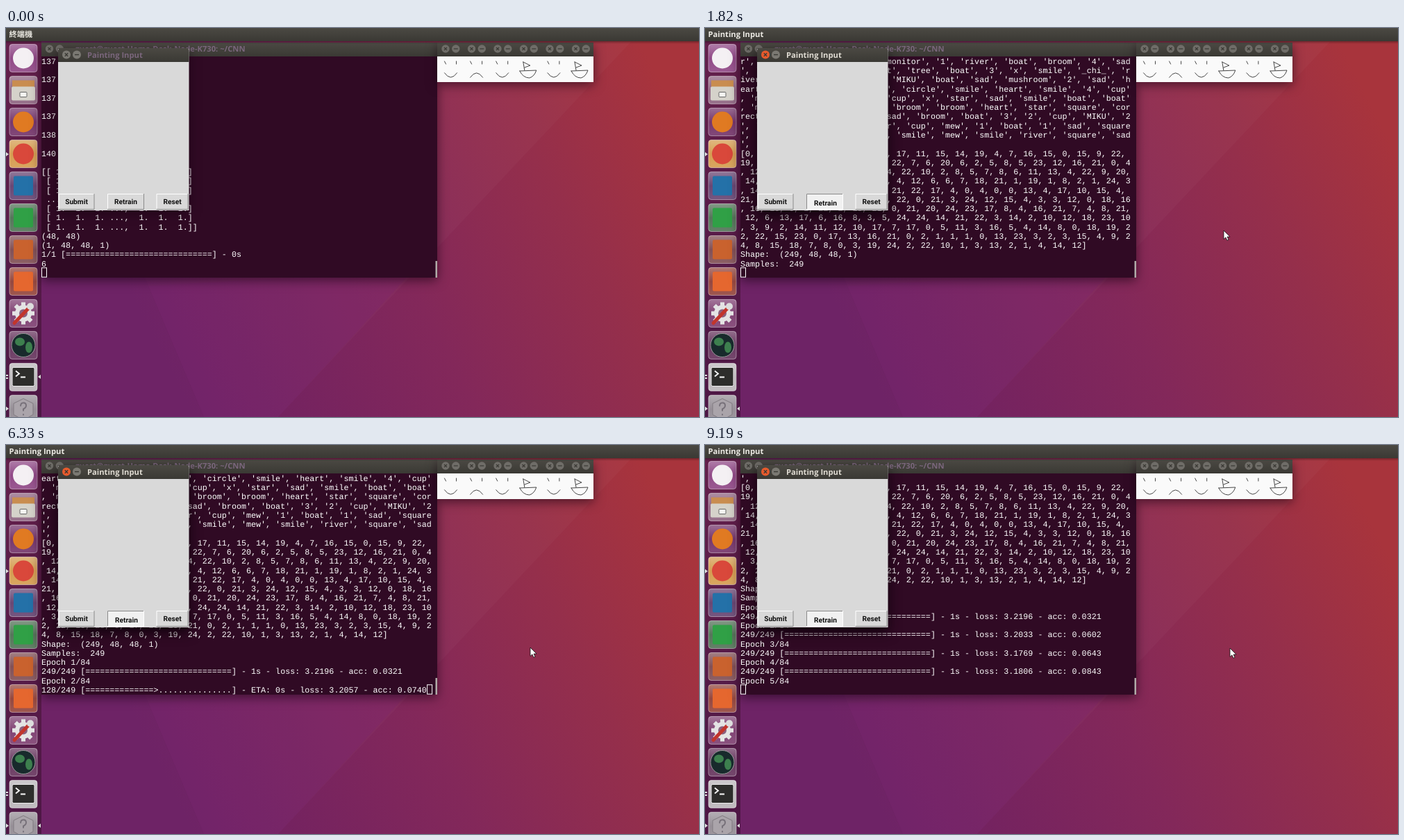
Animation of 998x561 px, one loop 9770 ms. Source, as an HTML page:

```html
<!DOCTYPE html>
<html lang="zh-Hant">
<head>
<meta charset="utf-8">
<title>Painting Input</title>
<style>
  html, body { margin: 0; width: 100%; height: 100%; overflow: hidden; background: #6e1f62; }
  svg { display: block; width: 100vw; height: 100vh; }
  text { white-space: pre; text-rendering: geometricPrecision; }
  .title { font: bold 11.2px "Open Sans", "Noto Sans CJK TC", "Noto Sans CJK", sans-serif; }
  .label { font: bold 10.2px Roboto, sans-serif; fill: #111; text-anchor: middle; }
  #rows text { font: 11.71px "Liberation Mono", monospace; fill: #fff; }
  .shadow { filter: drop-shadow(0 4px 8px rgba(20, 0, 15, .6)); }
  .focus { filter: drop-shadow(0 7px 9px rgba(10, 0, 8, .85)); }
  #sketches { fill: none; stroke: #333; stroke-width: .9; stroke-linecap: round; stroke-linejoin: round; }
</style>
</head>
<body>
<svg viewBox="0 0 998 561">
  <defs>
    <linearGradient id="wall" gradientUnits="userSpaceOnUse" x1="270" y1="560" x2="1000" y2="190">
      <stop offset="0" stop-color="#6d2063"/>
      <stop offset=".45" stop-color="#83285a"/>
      <stop offset=".75" stop-color="#952f4b"/>
      <stop offset="1" stop-color="#a8343c"/>
    </linearGradient>
    <linearGradient id="bar" x1="0" y1="0" x2="0" y2="1">
      <stop offset="0" stop-color="#4b4943"/>
      <stop offset="1" stop-color="#3a3934"/>
    </linearGradient>
    <linearGradient id="dock" x1="0" y1="0" x2="0" y2="1">
      <stop offset="0" stop-color="#64204c"/>
      <stop offset="1" stop-color="#4d1745"/>
    </linearGradient>
    <linearGradient id="gloss" x1="0" y1="0" x2="0" y2="1">
      <stop offset="0" stop-color="#fff" stop-opacity=".3"/>
      <stop offset=".5" stop-color="#fff" stop-opacity=".04"/>
      <stop offset="1" stop-color="#fff" stop-opacity=".12"/>
    </linearGradient>
    <linearGradient id="fade" x1="0" y1="0" x2="0" y2="1">
      <stop offset="0" stop-opacity=".3"/>
      <stop offset="1" stop-opacity="0"/>
    </linearGradient>
  </defs>

  <rect width="998" height="561" fill="url(#wall)"/>
  <path d="M50 20H900L392 561H50Z" fill="#fff" opacity=".025"/>
  <path d="M586 350L392 561H285L205 372Z" fill="#7a1f72" opacity=".2"/>
  <path d="M50 360H200L285 561H50Z" fill="#5d1c58" opacity=".1"/>

  <rect y="19" width="51" height="542" fill="url(#dock)"/>
  <g id="icons"></g>
  <g fill="#ddd">
    <path d="M0 179l4 3-4 3zM0 546l4 3-4 3z"/>
    <path d="M0 500h3v2H0zM0 504h3v2H0z"/>
    <path id="active" d="M50 -3v6l-4-3z"/>
  </g>

  <rect class="shadow" x="51" y="22" width="570" height="338" fill="#300a24"/>
  <rect x="51" y="21" width="570" height="20" fill="url(#bar)"/>
  <text class="title" x="344.500" y="34.300" text-anchor="end" fill="#7a667c">guest@guest-Home-Desk-Node-K730: ~/CNN</text>
  <g id="rows"></g>
  <rect id="caret" y="345.800" width="7" height="13.400" fill="none" stroke="#fff"/>
  <rect x="618.500" y="336" width="2.500" height="24" fill="#b0aaa8"/>

  <rect class="shadow" x="621" y="22" width="225" height="56" fill="#fafafa"/>
  <rect x="621" y="21" width="225" height="20" fill="url(#bar)"/>
  <g id="knobs"></g>
  <g id="sketches"></g>

  <rect id="panel" x="75" y="30" width="188.500" height="233" fill="#d9d9d9"/>
  <path d="M75 49V33q0-4 4-4h180.500q4 0 4 4v16z" fill="url(#bar)"/>
  <circle id="close" cx="87" cy="38.500" r="6"/>
  <path d="M84.800 36.300l4.400 4.400m0-4.400l-4.400 4.400" stroke="#3a3934" stroke-width="1.300"/>
  <circle cx="102" cy="38.500" r="6" fill="#7b7973"/>
  <path d="M99 38.500h6" stroke="#3a3934" stroke-width="1.400"/>
  <text id="winTitle" class="title" x="117" y="42.700">Painting Input</text>
  <g id="buttons"></g>

  <rect y="19" width="998" height="4" fill="url(#fade)"/>
  <rect width="998" height="19" fill="url(#bar)"/>
  <text id="appTitle" class="title" x="4.500" y="13.300" fill="#eceae4"></text>

  <path id="mouse" d="M0 0V12.500L2.900 9.900L4.900 14.300L7 13.400L5.100 9.100H9Z" fill="#fff" stroke="#111" stroke-width=".8"/>
</svg>
<script>
const LOOP = 9770, COLS = 80, ROWS = 24, CHAR = 7.027, LINE = 13.26;
const $ = id => document.getElementById(id);

function add(parent, tag, attrs, text = '') {
  const el = document.createElementNS('http://www.w3.org/2000/svg', tag);
  for (const k in attrs) el.setAttribute(k, attrs[k]);
  el.textContent = text;
  parent.append(el);
  return el;
}

// Launcher
const disc = c => `<circle r="15" fill="${c}"/>`;
const block = c => `<rect x="-14" y="-14" width="28" height="28" rx="2" fill="${c}"/>`;
const teeth = [0, 45, 90, 135].map(a =>
  `<rect x="-3" y="-16" width="6" height="32" fill="#e4e4e4" transform="rotate(${a})"/>`).join('');
const icons = [
  ['#8d4383', disc('#f4f0f3')],
  ['#8b607e', `<rect x="-16" y="-14" width="32" height="10" fill="#c98d50"/>
    <rect x="-17" y="-5" width="34" height="20" rx="2" fill="#d5d2ca"/>
    <rect x="-5" y="3" width="10" height="7" rx="1" fill="#f4f4f0" stroke="#666"/>`],
  ['#713067', disc('#e07a22')],
  ['#d49a4b', disc('#d9483b')],
  ['#63406f', block('#2471a8')],
  ['#4f7054', block('#30a046')],
  ['#7d4a50', block('#c9622e')],
  ['#914138', block('#e5672f')],
  ['#7b3b6e', `${teeth}<circle r="12" fill="#e4e4e4"/><circle r="6" fill="#8b607e"/>
    <path d="M-13 14L9 -9" stroke="#c2352c" stroke-width="5" stroke-linecap="round"/>
    <circle cx="10" cy="-10" r="5" fill="#ddd"/>`],
  ['#63305a', `<circle r="17" fill="#182a2c" stroke="#9a9a9a"/>
    <ellipse cx="-5" cy="-5" rx="7" ry="6" fill="#3d7f4e"/><ellipse cx="8" cy="3" rx="5" ry="8" fill="#3d7f4e"/>`],
  ['#b9b4b8', `<rect x="-16" y="-14" width="32" height="27" rx="2" fill="#2d2d2b" stroke="#eee"/>
    <path d="M-11 -9l5 4-5 4M-4 0h7" fill="none" stroke="#fff" stroke-width="1.800"/>`],
  ['#938c94', `<path d="M0 -15l14 7v16l-14 8-14-8V-8z" fill="#aaa4aa" stroke="#807a80"/>
    <path d="M-4 -4q0-5 4-5t4 4q0 3-4 5v3M0 7v2" fill="none" stroke="#77717a" stroke-width="2"/>`]
];
icons.forEach(([tile, art], i) => {
  const g = add($('icons'), 'g', { transform: `translate(25 ${43.5 + 46 * i})` });
  const shape = fill => `<rect x="-20" y="-20" width="40" height="40" rx="4" fill="${fill}"`;
  g.innerHTML = `${shape(tile)}/>${shape('url(#gloss)')} stroke="#fff" stroke-opacity=".4"/>${art}`;
});

// Unfocused title bars and the small sketches
function knob(x, mark) {
  add($('knobs'), 'circle', { cx: x, cy: 30, r: 5.7, fill: '#6f6d68' });
  add($('knobs'), 'path', { d: `M${x} 30${mark}`, stroke: '#3a3934', 'stroke-width': 1.2 });
}
function knobs(x) {
  knob(x, 'm-2 -2l4 4m0 -4l-4 4');
  knob(x + 14.8, 'm-3 0h6');
}
const face = bend => x =>
  `M${x - 9} 48l2 4M${x + 8} 48v4M${x - 9} ${68 - bend / 4}q9 ${bend} 18 0`;
const boat = x =>
  `M${x - 7} 49l10 5-8 3M${x - 7} 49l2 12M${x - 12} 62l24-1q-3 9-10 11q-9 0-14-10`;
const smile = face(13), sad = face(-13);

knobs(62.5);
[smile, sad, smile, boat, smile, boat].forEach((sketch, i) => {
  knobs(633 + 37.5 * i);
  add($('sketches'), 'path', { d: sketch(640.5 + 37.1 * i) });
});

// Painting window buttons
function button(x, w, name) {
  const box = add($('buttons'), 'rect', { x, y: 239, width: w, height: 23 });
  const lit = add($('buttons'), 'path', { d: `M${x + .5} 262V239.500H${x + w}`, fill: 'none' });
  const dim = add($('buttons'), 'path', { d: `M${x} 261.500H${x + w - .5}V239`, fill: 'none' });
  const label = add($('buttons'), 'text', { class: 'label' }, name);
  return (hover, down) => {
    box.setAttribute('fill', hover ? '#f1f1f1' : '#d9d9d9');
    lit.setAttribute('stroke', down ? '#8a8a8a' : '#fff');
    dim.setAttribute('stroke', down ? '#fff' : '#8a8a8a');
    label.setAttribute('x', x + w / 2 + (down ? 1 : 0));
    label.setAttribute('y', down ? 255.5 : 254.3);
  };
}
button(75.5, 52, 'Submit')(false, false);
button(216.5, 46, 'Reset')(false, false);
const retrain = button(146, 53, 'Retrain');

// Terminal output
const wide = (left, right) => left.padEnd(COLS - right.length) + right;
const done = '='.repeat(30), partway = '='.repeat(14) + '>' + '.'.repeat(15);
const progress = (count, bar, time, loss, acc) =>
  `${count}/249 [${bar}] - ${time} - loss: ${loss.toFixed(4)} - acc: ${acc.toFixed(4)}`;

const matrix = ['[[', ' [', ' [', '', ' [', ' [', ' ['].map((open, i) =>
  open ? `${open} 1.  1.  1. ...,  1.  1.  1.]${i === 6 ? ']' : ''}` : ' ..., ');
const before = [
  ...[137, 137, 137, 137, 138, 140].flatMap(n => [String(n), '']), ...matrix,
  '(48, 48)', '(1, 48, 48, 1)', `1/1 [${done}] - 0s`, '6'
];
const labels = [
  wide("r', ", "monitor', '1', 'river', 'boat', 'broom', '4', 'sad"),
  wide("', '", "t', 'tree', 'boat', '3', 'x', 'smile', '_chi_', 'r"),
  wide("iver", "'MIKU', 'boat', 'sad', 'mushroom', '2', 'sad', 'h"),
  wide("eart", "', 'circle', 'smile', 'heart', 'smile', '4', 'cup'"),
  wide(", 'm", "'cup', 'x', 'star', 'sad', 'smile', 'boat', 'boat'"),
  wide(", 'm", "'broom', 'broom', 'heart', 'star', 'square', 'cor"),
  wide("rect", "sad', 'broom', 'boat', '3', '2', 'cup', 'MIKU', '2"),
  wide("', '", "r', 'cup', 'mew', '1', 'boat', '1', 'sad', 'square"),
  wide("', '", ", 'smile', 'mew', 'smile', 'river', 'square', 'sad"),
  "',"
];

// Class ids from a seeded generator, wrapped at the terminal width
function classIds(length) {
  let seed = 7, ids = '[0';
  while (ids.length < length) {
    seed = seed * 16807 % 2147483647;
    ids += `, ${Math.floor(25 * (seed / 2147483647) ** 1.25)}`;
  }
  return (ids + ']').match(/.{1,80}/g);
}

// Each entry: time, finished lines, unfinished last line
const output = [[0, before, '']];
for (let t = 740; t < 1100; t += 40) output.push([t, Array(7).fill('(48, 48)'), '']);
output.push([1100, [...labels, ...classIds(867), 'Shape:  (249, 48, 48, 1)', 'Samples:  249'], '']);
output.push([3650, ['Epoch 1/84'], '']);

const EPOCH = 1367;
const results = [[3.2196, .0321], [3.2033, .0602], [3.1769, .0643], [3.1806, .0843]];
results.forEach(([loss, acc], i) => {
  const end = 5090 + EPOCH * i - i / 3;
  output.push([end - 720, [], progress(128, partway, 'ETA: 0s', loss + .0024, acc + .0138)]);
  output.push([end, [progress(249, done, '1s', loss, acc), `Epoch ${i + 2}/84`], '']);
});

const rows = Array.from({ length: ROWS }, (_, i) =>
  add($('rows'), 'text', { x: 51, y: 51.9 + LINE * i }));

let shown = 0;
function drawTerminal(t) {
  const past = output.filter(o => o[0] <= t);
  if (past.length === shown) return;
  shown = past.length;
  const tail = past[shown - 1][2];
  const lines = [...past.flatMap(o => o[1]).slice(1 - ROWS), tail];
  rows.forEach((row, i) => { row.textContent = lines[i]; });
  $('caret').setAttribute('x', 51.5 + tail.length * CHAR);
}

// Pointer: three curved strokes at 25 steps a second, then a slow drift
const curve = (k, a, b, c) => a * (1 - k) ** 2 + 2 * b * k * (1 - k) + c * k * k;
const strokes = [
  { from: 220, to: 700, x: [300, 200, 180], y: [420, 300, 251], ease: k => k },
  { from: 700, to: 1180, x: [180, 264, 349], y: [251, 347, 452], ease: k => k ** 2.8 },
  { from: 1180, to: 1820, x: [349, 620, 747], y: [452, 500, 292], ease: k => Math.sin(k * Math.PI / 2) }
];
function pointer(t) {
  const step = Math.floor((t - 20) / 40) * 40 + 20;
  const s = strokes.find(s => step < s.to);
  if (s) {
    const k = s.ease((step - s.from) / (s.to - s.from));
    return [curve(k, ...s.x), curve(k, ...s.y)];
  }
  if (t < 3650) return [747, 292];
  const drift = 1 - Math.exp((3650 - t) / 2000);
  return [751 + 5.5 * drift, 289 + 4 * drift];
}

function draw(t) {
  const focus = t >= 700;
  drawTerminal(t);
  $('appTitle').textContent = focus ? 'Painting Input' : '終端機';
  $('winTitle').setAttribute('fill', focus ? '#dfdbd2' : '#7a667c');
  $('close').setAttribute('fill', focus ? '#e75a2c' : '#7b7973');
  $('panel').setAttribute('class', focus ? 'focus' : 'shadow');
  $('active').setAttribute('transform', `translate(0 ${focus ? 549 : 503})`);
  retrain(t >= 660, focus);
  $('mouse').setAttribute('visibility', t < 220 ? 'hidden' : 'visible');
  if (t >= 220) $('mouse').setAttribute('transform', `translate(${pointer(t).map(Math.round).join(' ')})`);
}

const start = performance.now();
function tick() {
  draw((performance.now() - start) % LOOP);
  requestAnimationFrame(tick);
}
tick();
</script>
</body>
</html>
```
